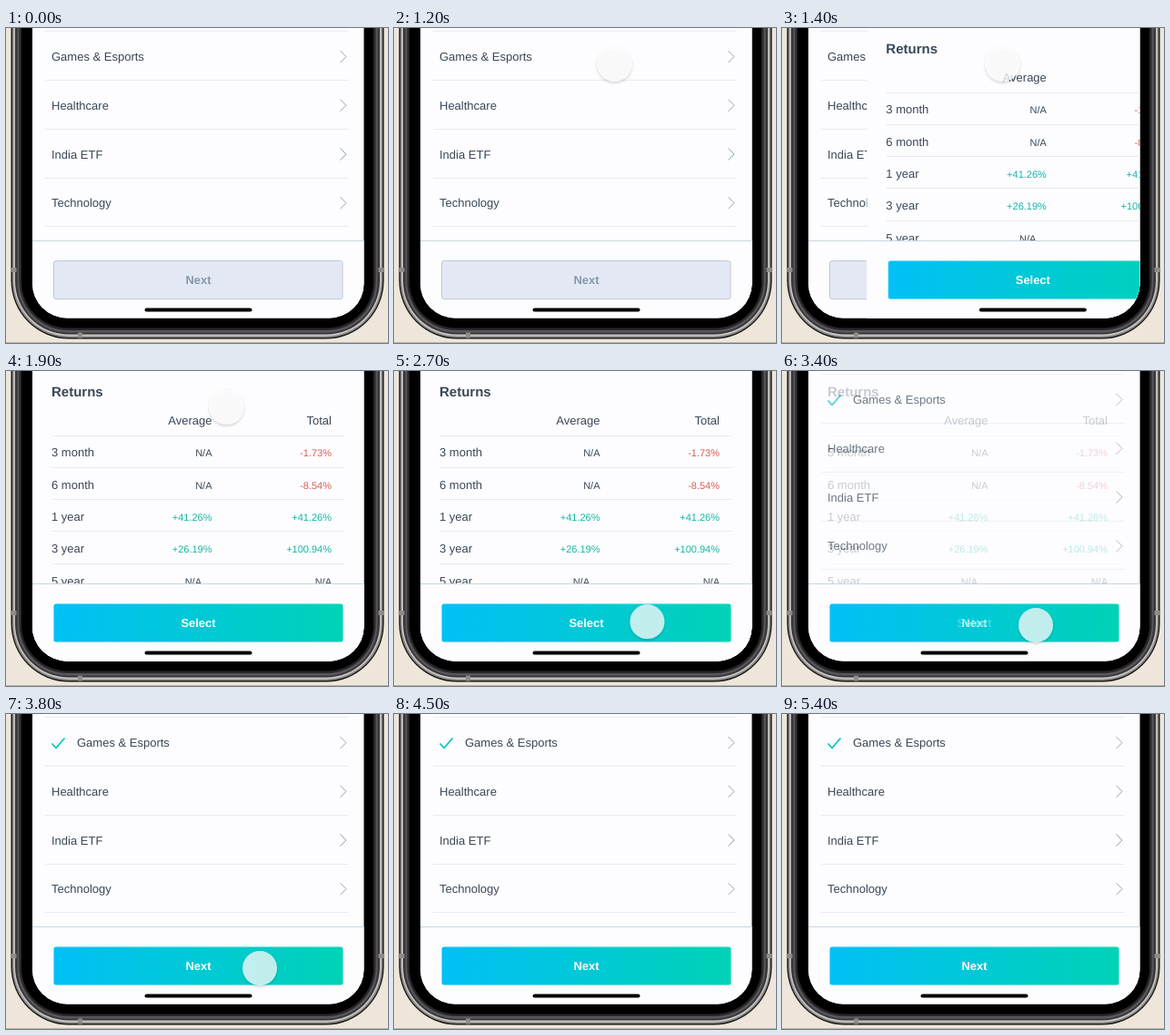
Animation of 420 by 347 pixels, one loop 5.5 s. Source, as an HTML page:

```html
<!DOCTYPE html>
<html lang="en">
<head>
<meta charset="utf-8">
<style>
html, body { margin: 0; width: 100%; height: 100%; overflow: hidden; background: #eee6da; }
svg { display: block; width: 420px; height: 347px; font: 13px "Liberation Sans", Arial, sans-serif; fill: #3a4756; text-rendering: geometricPrecision; }
.small { font-size: 11px; }
.title { font-weight: bold; font-size: 15px; }
.label { font-weight: bold; font-size: 12.9px; fill: #fff; text-anchor: middle; }
.end { text-anchor: end; }
.up { fill: #12b5a5; }
.down { fill: #dc5a55; }
.rule { stroke: #e7ebf1; }
.stroke { fill: none; stroke: #93a5b4; }
</style>
</head>
<body>
<svg viewBox="0 0 420 347">
  <defs>
    <linearGradient id="accent"><stop stop-color="#00c0f6"/><stop offset="1" stop-color="#00d2b6"/></linearGradient>
    <clipPath id="screen"><rect x="29" y="-60" width="364.500" height="379.500" rx="38"/></clipPath>
    <filter id="shadow" x="-30%" y="-30%" width="160%" height="160%">
      <feDropShadow dx="0" dy="1.5" stdDeviation="1.6" flood-opacity=".26"/>
    </filter>
  </defs>
  <path d="M0 346.5H420" stroke="#b9b2a6"/>
  <g id="body"></g>
  <g clip-path="url(#screen)">
    <g id="list"></g>
    <g id="detail"></g>
  </g>
  <circle id="touch" r="19" fill="#fff" fill-opacity=".73" filter="url(#shadow)"/>
</svg>
<script>
const LOOP = 5500;
const $ = id => document.getElementById(id);
const text = (x, y, s, cls = '') => `<text x="${x}" y="${y}" class="${cls}">${s}</text>`;
const rule = (x1, x2, y) => `<path class="rule" d="M${x1} ${y}H${x2}"/>`;
const sheet = '<rect x="29" y="-60" width="366" height="390" fill="#fdfdff"/>';
const button = '<rect x="52.5" y="256.5" width="318" height="42" rx="2.5" fill="url(#accent)"/>';
const footer = content => `<rect x="29" y="234" width="366" height="96" fill="#fdfdff"/>
  <path d="M29 234.5H395" stroke="#c6d6e0"/>${content}
  <rect x="152.500" y="308.400" width="118" height="4" rx="2" fill="#000"/>`;

// Nested rounded shells: inset, bottom edge, radius, colour
$('body').innerHTML = [
  [5.5, 342.5, 64, '#1c1b1b'], [7, 341, 62, '#8c8a89'], [8.5, 339.5, 61, '#c9c7c4'],
  [10, 337.5, 59, '#3a373a'], [12.5, 335.5, 56, '#5b565c'], [14.5, 333, 54, '#2a272b'], [17, 330.5, 51, '#000']
].map(([inset, bottom, r, fill]) =>
  `<rect x="${inset}" y="-80" width="${421 - 2 * inset}" height="${bottom + 80}" rx="${r}" fill="${fill}"/>`
).join('') + `<g fill="#8d8c88"><rect x="5.5" y="264" width="6" height="5"/>
  <rect x="409.5" y="264" width="6" height="5"/><rect x="79" y="335.5" width="5" height="6"/></g>`;

const names = ['Games &amp; Esports', 'Healthcare', 'India ETF', 'Technology'];
$('list').innerHTML = sheet + rule(43, 377, 3.5) + names.map((name, i) => {
  const y = 31.6 + i * 53.7;
  return `<g${i ? '' : ' id="first"'}>${text(50, y + 4.5, name)}</g>
    <path class="stroke" d="M367.5 ${y - 6.5}l6.5 6.5l-6.5 6.5"/>${rule(43, 377, Math.floor(y + 26) + .5)}`;
}).join('') + `<path id="check" d="M50.5 32.5l4.5 5l9.5-11" fill="none" stroke="#0cc3cc" stroke-width="1.8"/>` +
  footer(`<rect id="disabled" x="52.5" y="256.5" width="317.500" height="42" rx="2.5" fill="#e4e8f5" stroke="#bcc9d6"/>
    <g id="enabled">${button}</g><text id="next" class="label" x="211.5" y="282.3">Next</text>`);

const returns = [
  ['3 month', 'N/A', '-1.73%'], ['6 month', 'N/A', '-8.54%'],
  ['1 year', '+41.26%', '+41.26%'], ['3 year', '+26.19%', '+100.94%'], ['5 year', 'N/A', 'N/A']
];
const tone = s => 'small end ' + (s[0] === '+' ? 'up' : s[0] === '-' ? 'down' : '');
$('detail').innerHTML = sheet + text(50, 28, 'Returns', 'title') +
  text(226.5, 59.2, 'Average', 'end') + text(358, 59.2, 'Total', 'end') +
  returns.map(([term, average, total], i) => {
    const y = 94.3 + i * 35.3;
    return rule(50, 372, Math.floor(y - 23.3) + .5) + text(50, y, term) +
      text(i === 4 ? 215 : 226.5, y, average, tone(average)) + text(358, y, total, tone(total));
  }).join('') + footer(button + text(211.5, 282.3, 'Select', 'label'));

const ramp = (t, from, to) => Math.min(1, Math.max(0, (t - from) / (to - from)));
const easeOut = p => 1 - (1 - p) ** 3;
const easeInOut = p => p * p * (3 - 2 * p);

function draw(now) {
  const t = now % LOOP;
  const chosen = t > 2000;

  $('first').setAttribute('transform', `translate(${chosen ? 28 : 0} 0)`);
  $('check').style.display = $('enabled').style.display = chosen ? '' : 'none';
  $('disabled').style.display = chosen ? 'none' : '';
  $('next').style.fill = chosen ? '#fff' : '#8398ab';
  $('next').style.opacity = chosen ? ramp(t, 3200, 3450) : 1;

  const slide = 366 * (1 - easeOut(ramp(t, 1200, 1657)));
  $('detail').setAttribute('transform', `translate(${slide} 0)`);
  $('detail').style.opacity = 1 - ramp(t, 3110, 3510);

  const move = easeInOut(ramp(t, 2100, 2750));
  $('touch').setAttribute('transform', `translate(${242.5 + 36.5 * move} ${40 + 240 * move})`);
  $('touch').style.opacity = ramp(t, 900, 1100) - ramp(t, 4000, 4250);
  requestAnimationFrame(() => draw(performance.now()));
}
draw(performance.now());
</script>
</body>
</html>
```
